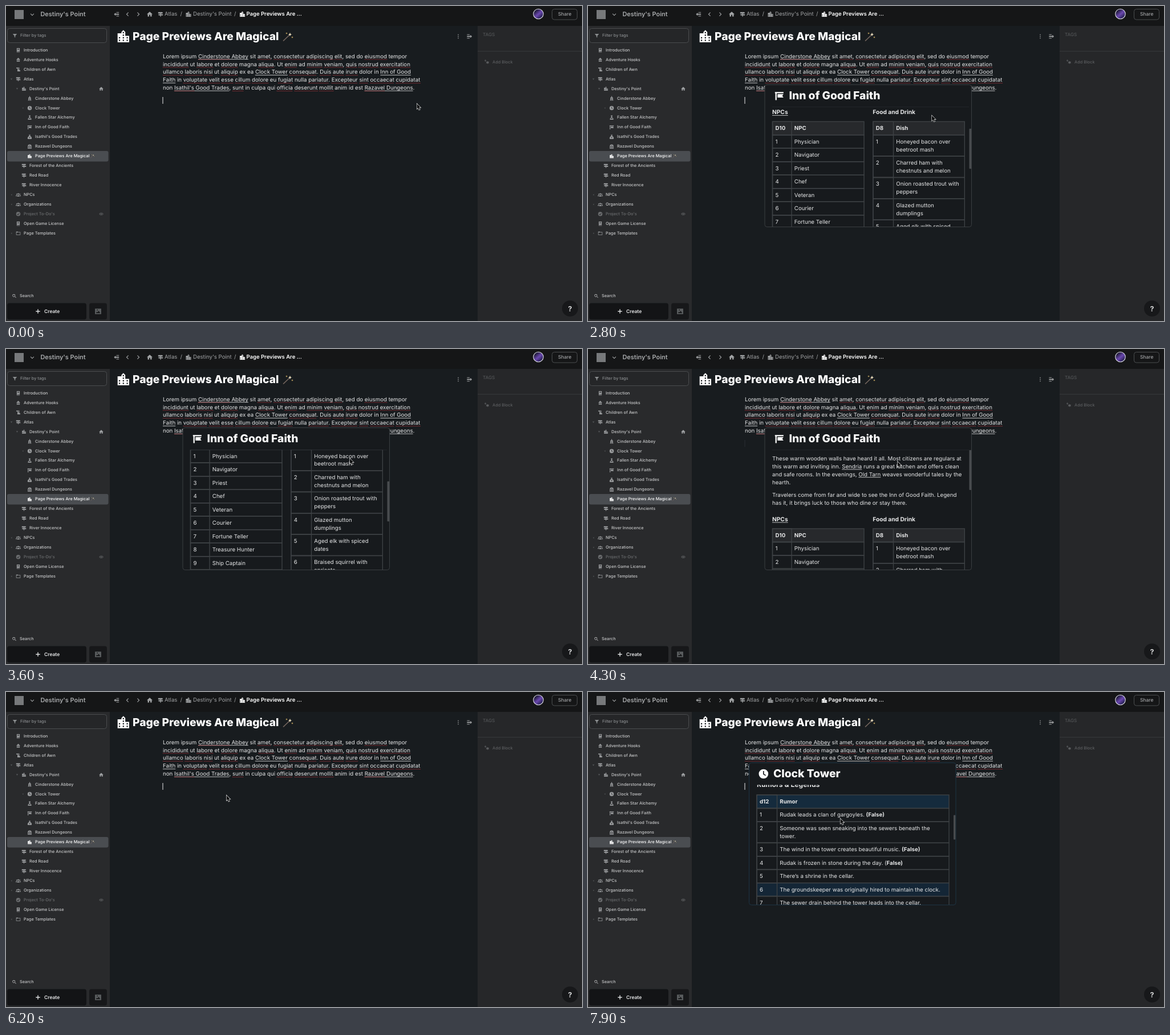
Write an HTML page with a canvas that moves like this. It is 1010 px wide and 554 px high and loops after 8000 ms.

```html
<!DOCTYPE html>
<html lang="en">
<head>
<meta charset="utf-8">
<title>Page previews</title>
<style>
html, body { margin: 0; width: 100%; height: 100%; overflow: hidden; background: #181c1f; }
canvas { display: block; }
</style>
</head>
<body>
<canvas id="stage" width="1010" height="554"></canvas>
<script>
const ctx = document.getElementById('stage').getContext('2d');
const LOOP = 8000, LINE = 13.85, BODY = 9.7, TITLE = 19.2;
const INK = '#e6e7e8', WHITE = '#fff', RULE = '#3d4144';

// Icons on a 24 unit grid, filled even-odd.
const ICONS = {
  book: 'M5 2h14v20H5zM8 5v2h8V5zM8 9v2h8V9zM7 18v2h12v-2z',
  tent: 'M12 2l8 8H4zM4 11h16v2H4zM5 14h4v7H5zM10 14h4v7h-4zM15 14h4v7h-4z',
  scroll: 'M3 3h14v12h4v6H8V8H3zM10 6v2h5V6zM10 10v2h5v-2z',
  sign: 'M2 3h17l3 3-3 3H2zM10.5 9h3v3h-3zM5 12h17v5H5l-3-2.5zM10.5 17h3v5h-3z',
  city: 'M19 15h-2v-2h2m0 6h-2v-2h2M13 7h-2V5h2m0 6h-2V9h2m0 6h-2v-2h2m0 6h-2v-2h2m-6-8H5V9h2m0 6H5v-2h2m0 6H5v-2h2m8-6V5l-3-3-3 3v2H3v14h18V11z',
  abbey: 'M11 1h2v3l5 5v11h2v2H4v-2h2V9l5-5zM10 10v3h4v-3zM10 16v4h4v-4z',
  clock: 'M12 2a10 10 0 1 0 0 20 10 10 0 0 0 0-20zM11 6h2v6l4 2.5-1 1.6-5-3.1z',
  flask: 'M8 2h8v3h-2v4l6 8v5H4v-5l6-8V5H8zM9 14l-2 3h10l-2-3z',
  inn: 'M2 3h20v3H6v16H3V6H2zM8 8h14l-3 4 3 4H8z',
  sack: 'M8 2h8l-2 5c9 4 10 15 4 15H6C0 22 1 11 10 7zM10 13v4h4v-4z',
  gate: 'M3 22V11a9 9 0 0 1 18 0v11zM6 20h2V9H6zM11 20h2V6h-2zM16 20h2V9h-2z',
  group: 'M12 5a3.5 3.5 0 1 1 0 7 3.5 3.5 0 0 1 0-7zM5 7a2.5 2.5 0 1 1 0 5 2.5 2.5 0 0 1 0-5zM19 7a2.5 2.5 0 1 1 0 5 2.5 2.5 0 0 1 0-5zM6 20c0-8 12-8 12 0zM0 19c0-4 2-6 6-5l-2 5zM24 19c0-4-2-6-6-5l2 5z',
  check: 'M12 2a10 10 0 1 0 0 20 10 10 0 0 0 0-20zM7 11l4 3 6-7 1 2-7 9-5-5z',
  folder: 'M2 4h8l2 2h10v14H2zM4 8v10h16V8z',
  person: 'M12 4a4 4 0 1 1 0 8 4 4 0 0 1 0-8zM4 21c0-10 16-10 16 0z',
  home: 'M10 20v-6h4v6h5v-8h3L12 3 2 12h3v8z',
  right: 'M8.6 16.6 13.2 12 8.6 7.4 10 6l6 6-6 6z',
  left: 'M15.4 16.6 10.8 12l4.6-4.6L14 6l-6 6 6 6z',
  down: 'M7.4 8.6 12 13.2l4.6-4.6L18 10l-6 6-6-6z',
  more: 'M9 12l6-5v10z',
  open: 'M6 8h12l-6 9z',
  collapse: 'M2 12l6-6v4h13v4H8v4zM11 4h10v2H11zM11 18h10v2H11z',
  expand: 'M22 12l-6-6v4H3v4h13v4zM3 4h10v2H3zM3 18h10v2H3z',
  filter: 'M2 4h20l-8 9v8l-4-2v-6z',
  hidden: 'M1 12C6 3 18 3 23 12 18 21 6 21 1 12zM4 12c4 6 12 6 16 0-4-6-12-6-16 0zM12 9a3 3 0 1 1 0 6 3 3 0 0 1 0-6z',
  search: 'M10 3a7 7 0 1 0 0 14 7 7 0 0 0 0-14zM10 5a5 5 0 1 1 0 10 5 5 0 0 1 0-10zM15 16l5 5 1.5-1.5-5-5z',
  plus: 'M10.5 4h3v6.5h6.5v3h-6.5v6.5h-3v-6.5H4v-3h6.5z',
  image: 'M2 3h20v18H2zM5 18h14l-5-8-4 5-2-2zM8 6v3h3V6z',
  dots: 'M10.5 4h3v3h-3zM10.5 10.5h3v3h-3zM10.5 17h3v3h-3z',
  star: 'M12 1l3 8 8 3-8 3-3 8-3-8-8-3 8-3z',
  block: 'M13 8l2 3 5-1-3 4 3 4-5-1-2 4-2-4-5 1 3-4-3-4 5 1zM3 2h2v3h3v2H5v3H3V7H0V5h3z'
};
for (const name in ICONS) ICONS[name] = new Path2D(ICONS[name]);
const ARROW = new Path2D('M0 0V9L2 7.2 3.6 10.8 5.2 10.1 3.7 6.6H6.4Z');

function icon(name, cx, cy, size, color) {
  ctx.save();
  ctx.translate(cx - size / 2, cy - size / 2);
  ctx.scale(size / 24, size / 24);
  ctx.fillStyle = color;
  ctx.fill(ICONS[name], 'evenodd');
  ctx.restore();
}

function rect(x, y, w, h, fill) {
  ctx.fillStyle = fill;
  ctx.fillRect(x, y, w, h);
}

function box(x, y, w, h, radius, fill, stroke) {
  ctx.beginPath();
  ctx.roundRect(x, y, w, h, radius);
  if (fill) { ctx.fillStyle = fill; ctx.fill(); }
  if (stroke) { ctx.strokeStyle = stroke; ctx.lineWidth = 1; ctx.stroke(); }
}

function disc(x, y, r, fill) {
  ctx.beginPath();
  ctx.arc(x, y, r, 0, 7);
  ctx.fillStyle = fill;
  ctx.fill();
}

const MISSPELT = /\b(?!(?:ipsum|magna|dolor|tempor|nulla|culpa)\b)(?:amet|elit|quis|enim|nisi|aute|esse|sint|sunt|Duis|Excepteur|Cinderstone|Isathil's|Razavel|[a-z]{5,})\b/g;

// y is the visual middle of the line; _link_ underlines, *bold* thickens.
function text(x, y, str, size = BODY, weight = 400, color = INK, spell = false) {
  const base = y + size * .364 - .5;
  let link = false, bold = false;
  for (const part of str.split(/([_*])/)) {
    if (part === '_') { link = !link; continue; }
    if (part === '*') { bold = !bold; continue; }
    ctx.font = `${bold ? 700 : weight} ${size}px Inter, sans-serif`;
    ctx.fillStyle = color;
    ctx.fillText(part, x, base);
    const width = ctx.measureText(part).width;
    if (link) ctx.fillRect(x, base + 1.6, width, .8);
    if (spell) {
      ctx.fillStyle = '#b0363d';
      for (const word of part.matchAll(MISSPELT)) {
        const from = x + ctx.measureText(part.slice(0, word.index)).width;
        const end = from + ctx.measureText(word[0]).width;
        for (let dot = from; dot < end - .5; dot += 2) ctx.fillRect(dot, base + 1.8, 1.2, 1);
      }
    }
    x += width;
  }
}

const small = (x, y, str, color, weight = 500) => {
  ctx.letterSpacing = '.04px';
  text(x, y, str, 7.27, weight, color);
  ctx.letterSpacing = '0px';
};
const lines = (x, y, rows, spell) =>
  rows.forEach((row, i) => text(x, y + i * LINE, row, BODY, 400, INK, spell));

// Cells may hold several lines, parted by "|".
function table(x, y, w, split, head, rows, headFill, tinted) {
  [head, ...rows].forEach((cell, i) => {
    const first = i ? String(i) : cell[0];
    const body = (i ? cell : cell[1]).split('|');
    const h = 23.5 + (body.length - 1) * LINE;
    if (!i) rect(x, y, w, h, headFill);
    if (i && i === tinted) rect(x, y, w, h, '#142636');
    ctx.strokeStyle = RULE;
    ctx.lineWidth = 1.4;
    ctx.strokeRect(x, y, w, h);
    ctx.strokeRect(x, y, split, h);
    text(x + 5, y + 11.9, first, BODY, i ? 400 : 700);
    body.forEach((s, k) => text(x + split + 4.8, y + 11.9 + k * LINE, s, BODY, i ? 400 : 700));
    y += h;
  });
}

function popup(p, alpha, scroll = 0) {
  if (alpha <= 0) return;
  ctx.save();
  ctx.globalAlpha = alpha;
  ctx.translate(p.x, p.y);
  box(0, 0, 362.5, 250, 4, '#171a1d', p.border || '#3a3e41');
  icon(p.icon, 25.3, 19.5, p.iconSize || 18, WHITE);
  text(42.5, 19.5, p.title, TITLE, 800, WHITE);
  if (p.rule) rect(13, 38.6, 345, .8, '#25292c');
  ctx.beginPath();
  ctx.rect(1, 39, 361, 210.5);
  ctx.clip();
  if (p.thumb) box(358.5, 39 + scroll * p.rate, 3.8, p.thumb, 1, '#484b4e');
  ctx.translate(0, -scroll);
  p.body();
  ctx.restore();
}

const INN = {
  x: 310, y: 138.5, title: 'Inn of Good Faith', icon: 'inn', rule: true, thumb: 70.5, rate: .34,
  body() {
    lines(13, 54.5, ['These warm wooden walls have heard it all. Most citizens are regulars at',
      'this warm and inviting inn. _Sendria_ runs a great kitchen and offers clean',
      'and safe rooms. In the evenings, _Old Tarn_ weaves wonderful tales by the', 'hearth.']);
    lines(13, 118.5, ['Travelers come from far and wide to see the Inn of Good Faith. Legend',
      'has it, it brings luck to those who dine or stay there.']);
    text(13, 161.3, '_NPCs_', 10.2, 700);
    text(189.3, 161.3, 'Food and Drink', 10.2, 700);
    table(13.5, 177.5, 160.5, 33.5, ['D10', 'NPC'], ['Physician', 'Navigator', 'Priest', 'Chef', 'Veteran',
      'Courier', 'Fortune Teller', 'Treasure Hunter', 'Ship Captain', 'Merchant'], '#27292c');
    table(189.8, 177.5, 160.5, 35.7, ['D8', 'Dish'], ['Honeyed bacon over|beetroot mash',
      'Charred ham with|chestnuts and melon', 'Onion roasted trout with|peppers', 'Glazed mutton|dumplings',
      'Aged elk with spiced|dates', 'Braised squirrel with|apricots', 'Pickled eel with|barley bread',
      'Baked figs with|soft cheese'], '#27292c');
  }
};

const STORYTELLER = {
  x: 312.5, y: 228.5, title: 'Old Tarn', icon: 'person', rule: true,
  body() {
    lines(13, 54.5, ['A storyteller who spends his evenings by the hearth of the inn. He knows',
      'every tale that was ever told in town.']);
  }
};

const TOWER = {
  x: 282.5, y: 124.5, title: 'Clock Tower', icon: 'clock', iconSize: 20, border: '#1d3444', thumb: 43, rate: .205,
  body() {
    box(13.5, 56.5, 337, 177, 3, '#13283a');
    text(33, 72.5, 'What happened to the Clock Tower', BODY, 700);
    lines(33, 94.5, ['The doors open to a narrow hall of worn stone. Gears',
      'turn slowly overhead, and dust falls with each beat.', 'A spiral stair climbs to the bells.']);
    lines(33, 148, ['Stone figures watch from the ledges. Some say that', 'they change their places at night.']);
    lines(13.5, 254, ['The tower stands in the middle of the town.']);
    text(13.5, 297.5, 'Rumors & Legends', 12.1, 700);
    table(13.5, 315.5, 337, 35.5, ['d12', 'Rumor'], ['Rudak leads a clan of gargoyles. *(False)*',
      'Someone was seen sneaking into the sewers beneath the|tower.',
      'The wind in the tower creates beautiful music. *(False)*',
      'Rudak is frozen in stone during the day. (*False)*', 'There’s a shrine in the cellar.',
      'The groundskeeper was originally hired to maintain the clock.',
      'The sewer drain behind the tower leads into the cellar.'], '#152b3d', 6);
  }
};

// label, icon, depth, toggle
const TREE = [
  ['Introduction', 'book', 0], ['Adventure Hooks', 'tent', 0], ['Children of Awn', 'scroll', 0],
  ['Atlas', 'sign', 0, 'open'], ["Destiny's Point", 'city', 1, 'open'], ['Cinderstone Abbey', 'abbey', 2],
  ['Clock Tower', 'clock', 2, 'more'], ['Fallen Star Alchemy', 'flask', 2], ['Inn of Good Faith', 'inn', 2],
  ["Isathil's Good Trades", 'sack', 2], ['Razavel Dungeons', 'gate', 2], ['Page Previews Are Magical', 'city', 2],
  ['Forest of the Ancients', 'sign', 1], ['Red Road', 'sign', 1], ['River Innocence', 'sign', 1],
  ['NPCs', 'group', 0, 'more'], ['Organizations', 'group', 0, 'more'], ["Project To-Do's", 'check', 0],
  ['Open Game License', 'book', 0], ['Page Templates', 'folder', 0, 'more']
];

function wand(x, y, scale) {
  ctx.strokeStyle = '#75665f';
  ctx.lineWidth = 1.7 * scale;
  ctx.beginPath();
  ctx.moveTo(x - 8 * scale, y + 7.5 * scale);
  ctx.lineTo(x + 3 * scale, y - 3 * scale);
  ctx.stroke();
  icon('star', x + 4 * scale, y - 4 * scale, 7 * scale, '#f3e6c4');
  icon('star', x + 8 * scale, y + 1 * scale, 4 * scale, '#e5c070');
  icon('star', x - 2 * scale, y - 6 * scale, 4 * scale, '#e5c070');
}

function sidebar() {
  rect(0, 35, 182, 519, '#292a2c');
  box(2.5, 39.5, 174, 25, 4, '#252628', '#4a4c4e');
  icon('filter', 15.5, 52, 9, '#8b8e90');
  small(25, 52, 'Filter by tags', '#8b8e90');
  TREE.forEach(([label, glyph, depth, toggle], i) => {
    const y = 77.7 + i * 16.95, x = 31 + depth * 10;
    const active = i === 11, dim = i === 17;
    if (active) box(2, 255, 177.5, 18.5, 3, '#4a4d51');
    icon(glyph, x - 9.5, y, 9, active ? WHITE : dim ? '#6b6d6f' : '#97999b');
    if (toggle) icon(toggle, x - 21.5, y, 7, '#55585a');
    small(x, y, label, active ? WHITE : dim ? '#6b6d6f' : '#c8c9ca');
  });
  wand(151.5, 264, .4);
  icon('home', 167, 145.7, 9, '#a0a2a4');
  icon('hidden', 167, 365.8, 8, '#67696b');
  icon('search', 14.5, 510, 8.5, '#c8c9ca');
  small(24, 509.8, 'Search', '#c8c9ca');
  box(2, 522.5, 139, 29, 4, '#131416');
  icon('plus', 56, 537, 11, '#e0e1e2');
  text(67, 537, 'Create', 8.48, 600);
  box(146, 522.5, 31, 29, 4, '#17181a');
  icon('image', 161.5, 537, 13, '#5a5d5f');
}

function topbar() {
  const grey = '#a2a4a6';
  rect(0, 0, 1010, 35, '#151617');
  rect(15, 7, 16, 16, '#77797b');
  icon('down', 46, 15, 13, grey);
  text(60.5, 14.5, "Destiny's Point", 10.9, 600, '#a9abad');
  icon('collapse', 194, 14.5, 11, grey);
  icon('left', 213, 14.5, 14, grey);
  icon('right', 232, 14.5, 14, grey);
  icon('home', 252, 14.5, 12, grey);
  icon('sign', 271, 14.5, 10, grey);
  text(278, 14.5, 'Atlas', 9.6, 400, grey);
  text(305.5, 14.5, '/', 9.6, 400, grey);
  icon('city', 320, 14.5, 12, grey);
  text(328, 14.5, "Destiny's Point", 9.6, 400, grey);
  text(400, 14.5, '/', 9.6, 400, grey);
  icon('city', 414.5, 14.5, 12, WHITE);
  text(421.5, 14.5, 'Page Previews Are ...', 9.5, 600, WHITE);
  disc(933.5, 14, 9.3, '#dcdce4');
  const glow = ctx.createLinearGradient(928, 8, 939, 21);
  glow.addColorStop(0, '#1a1730');
  glow.addColorStop(.5, '#6a48b0');
  glow.addColorStop(1, '#1d1b45');
  disc(933.5, 14, 8.2, glow);
  box(957.5, 5.5, 44, 18.5, 4, null, '#4b4d4f');
  text(968, 14.5, 'Share', 8.48, 500, '#a2a4a6');
}

function rightPanel() {
  rect(827, 35, 183, 519, '#262729');
  text(836, 50.5, 'TAGS', 8.1, 500, '#525456');
  rect(827, 79, 183, 1, '#37393b');
  icon('block', 844, 98.5, 10, '#5c5e60');
  small(853, 98.5, 'Add Block', '#5c5e60');
  disc(989, 532, 14, '#17181a');
  text(985.5, 532.5, '?', 12.5, 700, '#d8d9da');
}

function page(caret) {
  rect(182, 35, 645, 519, '#181c1f');
  icon('city', 205.8, 53.5, 27, WHITE);
  text(222, 53.5, 'Page Previews Are Magical', TITLE, 800, WHITE);
  wand(494, 54, 1);
  icon('dots', 793, 53.5, 11, '#9c9ea0');
  icon('expand', 812.5, 53.5, 11, '#9c9ea0');
  lines(275, 88.7, [
    'Lorem ipsum _Cinderstone Abbey_ sit amet, consectetur adipiscing elit, sed do eiusmod tempor',
    'incididunt ut labore et dolore magna aliqua. Ut enim ad minim veniam, quis nostrud exercitation',
    'ullamco laboris nisi ut aliquip ex ea _Clock Tower_ consequat. Duis aute irure dolor in _Inn of Good_',
    '_Faith_ in voluptate velit esse cillum dolore eu fugiat nulla pariatur. Excepteur sint occaecat cupidatat',
    "non _Isathil's Good Trades_, sunt in culpa qui officia deserunt mollit anim id est _Razavel Dungeons_."
  ], true);
  rect(274.5, 160, 1, 12, `rgba(235,236,237,${caret})`);
}

const clamp = v => Math.min(1, Math.max(0, v));
const ramp = (t, from, to) => clamp((t - from) / (to - from));

// Smooth curve through [time, value...] keys that rests on holds and turning points.
function follow(keys, t, dim) {
  const last = keys.length - 1;
  if (t <= keys[0][0]) return keys[0][dim];
  if (t >= keys[last][0]) return keys[last][dim];
  const i = keys.findIndex(k => k[0] > t) - 1;
  const slope = k => {
    if (k < 1 || k >= last) return 0;
    const before = keys[k][dim] - keys[k - 1][dim], after = keys[k + 1][dim] - keys[k][dim];
    return before * after <= 0 ? 0 : (before + after) / (keys[k + 1][0] - keys[k - 1][0]);
  };
  const [a, b] = [keys[i], keys[i + 1]], h = b[0] - a[0], u = (t - a[0]) / h, v = 1 - u;
  return v * v * (1 + 2 * u) * a[dim] + u * u * (3 - 2 * u) * b[dim]
    + h * u * v * (v * slope(i) - u * slope(i + 1));
}

const POINTER = [[50, 720.6, 172], [500, 694, 117], [1150, 694, 117], [1880, 603, 192.7], [4050, 603, 192.7],
  [4300, 543, 198], [4650, 495, 217], [5150, 495, 217], [5500, 286, 292], [5750, 286, 292],
  [6200, 386.5, 182], [6680, 482, 116], [7050, 482, 116], [7480, 442.5, 222.7]];
const INN_SCROLL = [[2300, 0], [2800, 112.5], [3200, 178], [3600, 163], [4050, 0]];
const TOWER_SCROLL = [[7530, 0], [7900, 259]];

function draw(t) {
  const beat = t % 1000;
  page(Math.max(1 - ramp(beat, 220, 310), ramp(beat, 710, 800)));
  sidebar();
  rightPanel();
  topbar();
  const leave = 1 - ramp(t, 5250, 5420);
  popup(INN, Math.min(ramp(t, 650, 820), leave), follow(INN_SCROLL, t, 1));
  popup(STORYTELLER, Math.min(ramp(t, 4930, 5080), leave));
  popup(TOWER, ramp(t, 6760, 6930), follow(TOWER_SCROLL, t, 1));
  ctx.save();
  ctx.translate(follow(POINTER, t, 1), follow(POINTER, t, 2));
  ctx.lineWidth = 1.2;
  ctx.strokeStyle = '#f2f2f2';
  ctx.stroke(ARROW);
  ctx.fillStyle = '#0c0d0e';
  ctx.fill(ARROW);
  ctx.restore();
}

ctx.textRendering = 'geometricPrecision';
const start = performance.now();
(function tick() {
  draw((performance.now() - start) % LOOP);
  requestAnimationFrame(tick);
})();
</script>
</body>
</html>
```
